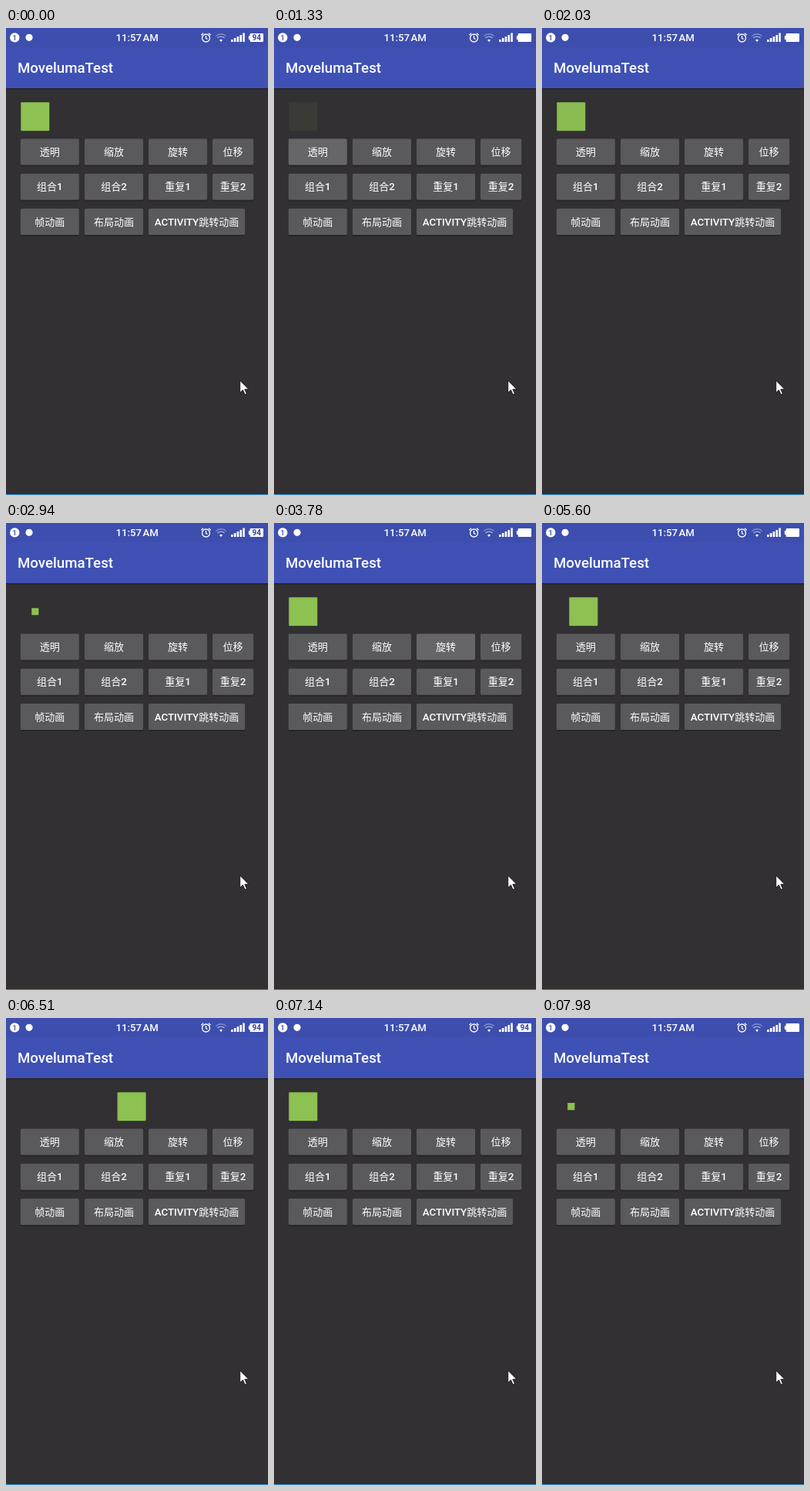
An HTML page that plays this animation: 340x605 px, repeating every 8000 ms.

```html
<!DOCTYPE html>
<html lang="zh">
<head>
<meta charset="utf-8">
<title>Animation buttons</title>
<style>
  html, body { margin: 0; width: 100%; height: 100%; overflow: hidden; background: #323032; }
  svg { display: block; width: 100%; height: 100%; }
  text { font-family: Roboto, "Noto Sans CJK SC", "Noto Sans CJK", sans-serif; fill: #fff; font-weight: 500; }
  .label { font-size: 13px; font-weight: 400; text-anchor: middle; }
  .latin { font-size: 13.3px; font-weight: 500; }
  .line { fill: none; stroke: #fff; stroke-width: 1.3; }
</style>
</head>
<body>
<svg viewBox="0 0 340 605">
  <defs>
    <linearGradient id="shade" x2="0" y2="1">
      <stop stop-color="#000" stop-opacity=".35"/>
      <stop offset="1" stop-color="#000" stop-opacity="0"/>
    </linearGradient>
  </defs>
  <rect width="340" height="605" fill="#323032"/>
  <rect width="340" height="78" fill="#3f51b5"/>
  <rect width="340" height="25" fill="#3d4eae"/>
  <rect y="78" width="340" height="2.5" fill="url(#shade)"/>
  <rect y="604" width="340" height="1" fill="#318fd0"/>

  <g id="status" fill="#fff">
    <circle cx="11.3" cy="12.4" r="6.2"/>
    <text x="11.2" y="15.8" style="font-size:9.5px;fill:#3d4eae;text-anchor:middle">1</text>
    <circle cx="30" cy="12.3" r="4.6"/>
    <text x="142.6" y="17.2" style="font-size:13.2px">11:57<tspan dx="1.4">AM</tspan></text>
    <circle class="line" cx="259.5" cy="13" r="5"/>
    <path class="line" d="M259.5 10v3.3l2 1.2M253.4 9.2l2.7-2.4M265.6 9.2l-2.7-2.4"/>
    <path class="line" d="M272.2 10.6a9.5 9.5 0 0 1 13.6 0" opacity=".35"/>
    <path class="line" d="M274.4 13a6.4 6.4 0 0 1 9.2 0" opacity=".55"/>
    <path d="M277 15.8a2.8 2.8 0 0 1 4 0L279 18z"/>
    <path d="M292 15h2.6v3H292zM295.8 13h2.6v5h-2.6zM299.6 11h2.6v7h-2.6zM303.4 9h2.6v9h-2.6zM307.2 6.5h2.6V18h-2.6z"/>
    <rect x="314.8" y="10" width="3" height="5" rx="1"/>
    <rect x="316.6" y="7" width="17.4" height="11" rx="1.2"/>
    <text id="charge" x="325.2" y="16.1" style="font-size:10px;font-weight:700;fill:#35469f;text-anchor:middle">94</text>
  </g>

  <text x="15" y="58" style="font-size:18.7px">MovelumaTest</text>
  <g id="buttons"></g>
  <rect id="icon" x="-18.5" y="-18.5" width="37" height="37" rx="1" fill="#8dc152"/>
  <path d="M303.7 456.8v15.6l3.7-3.5 2.6 5.9 2.4-1-2.6-5.8h5z" fill="#fff" stroke="#171717" stroke-width=".9"/>
</svg>
<script>
const LOOP = 8000, STEP = 70;
const svgNS = "http://www.w3.org/2000/svg";
const byId = id => document.getElementById(id);
const icon = byId("icon"), charge = byId("charge");

function add(parent, tag, attrs, content = "") {
  const node = document.createElementNS(svgNS, tag);
  for (const key in attrs) node.setAttribute(key, attrs[key]);
  node.textContent = content;
  return parent.appendChild(node);
}

function addButton(label, x, y, width) {
  const group = byId("buttons");
  add(group, "rect", { x, y: y + 1, width, height: 35, rx: 2, fill: "#000", opacity: .22 });
  add(group, "rect", { x, y, width, height: 34, rx: 1.6, fill: "#5a595c" });
  const glow = add(group, "rect", { x, y, width, height: 34, rx: 1.6, fill: "#fff", opacity: 0 });
  const text = add(group, "text", { x: x + width / 2, y: y + 21.6, class: "label" });
  for (const part of label.match(/\w+|[^\w]+/g))
    add(text, "tspan", /\w/.test(part) ? { class: "latin" } : {}, part);
  return glow;
}

const columns = [[18.8, 76], [102, 76], [185, 76], [268, 53.2]];
const rows = [
  ["透明", "缩放", "旋转", "位移"],
  ["组合1", "组合2", "重复1", "重复2"],
  ["帧动画", "布局动画", "ACTIVITY跳转动画"]
];
const glows = {};
rows.forEach((labels, row) => labels.forEach((label, col) => {
  const [x, width] = columns[col];
  glows[label] = addButton(label, x, 143.4 + row * 45.3, row === 2 && col === 2 ? 125 : width);
}));

const clamp = v => Math.min(1, Math.max(0, v));
const ease = v => (1 - Math.cos(Math.PI * v)) / 2;

// Each press: button, touch down, animation start, duration, animated property.
const presses = [
  ["透明", 560, 1150, 1000, "alpha"],
  ["缩放", 2310, 2610, 1000, "scale"],
  ["旋转", 3500, 3800, 1000, "turn"],
  ["位移", 4900, 5220, 1840, "shift"],
  ["组合1", 7140, 7380, 1800, "scale"]
];

function draw(t) {
  const pose = { alpha: 1, scale: 1, turn: 0, shift: 0 };
  for (const [label, down, start, duration, property] of presses) {
    const held = clamp((t - down) / 140) * (1 - clamp((t - start - 190) / 130));
    glows[label].setAttribute("opacity", held * .07);
    if (t >= start && t < start + duration) pose[property] = ease((t - start) / duration);
  }
  icon.setAttribute("opacity", pose.alpha);
  icon.setAttribute("transform",
    `translate(${37.8 + pose.shift * 157.5} 114.7) rotate(${pose.turn * 360}) scale(${pose.scale})`);
  const blink = Math.floor((t - 1010) / 1060);
  charge.setAttribute("opacity", t >= 1010 && blink % 2 === 0 ? 0 : 1);
}

const begin = performance.now();
function tick() {
  const t = (performance.now() - begin) % LOOP;
  draw(Math.floor(t / STEP) * STEP);
  requestAnimationFrame(tick);
}
tick();
</script>
</body>
</html>
```
